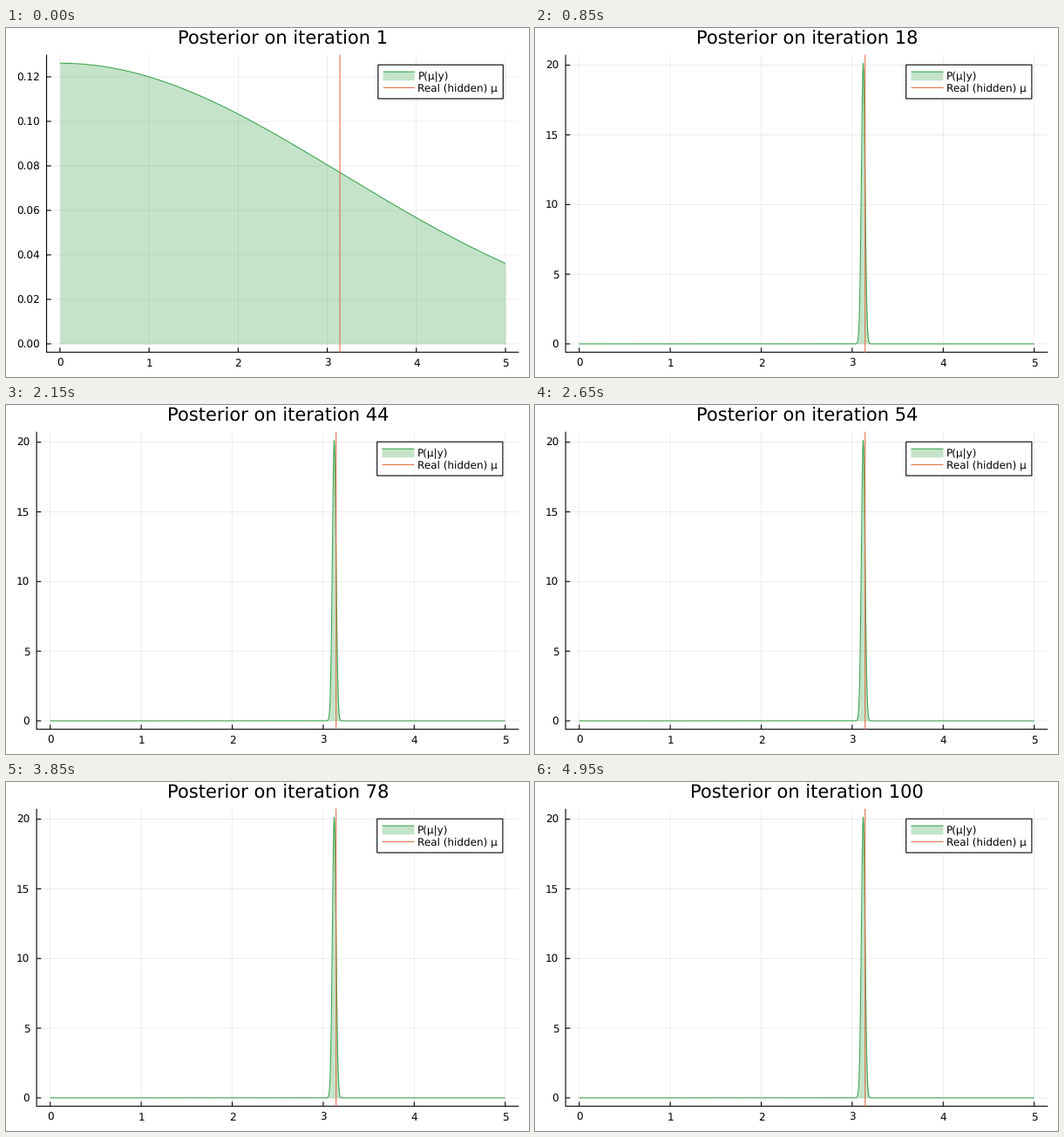
A matplotlib script for the animation above (5000 ms loop, 600 px wide and 400 px high).

```python
import numpy as np
import matplotlib.pyplot as plt
from matplotlib.animation import FuncAnimation
from matplotlib.patches import Rectangle

W, H, DPI = 600, 400, 100
FRAMES, INTERVAL = 100, 50
PX = 72 / DPI  # points per pixel

GREEN, RED = "#3da44e", "#e36f47"
TOP, BOTTOM, RIGHT = 30.65, 371.65, 588.35
SMALL, LARGE = 12, 21
HIDDEN_MU = 3.1415

# Variational estimate of a normal mean with unknown precision
N_OBS = 1000
PRIOR_VAR = 10.0
SAMPLE_MEAN = 3.121
SAMPLE_VAR = 0.391

plt.rcParams.update({
    "font.family": "DejaVu Sans",
    "text.hinting": "none",
    "savefig.dpi": DPI,
    "path.snap": False,
})


def posteriors(count):
    """Mean and variance of q(mu) after each iteration."""
    mean, var = 0.0, PRIOR_VAR
    steps = [(mean, var)]
    for _ in range(count - 1):
        noise = SAMPLE_VAR + var + (SAMPLE_MEAN - mean) ** 2
        var = 1 / (1 / PRIOR_VAR + N_OBS / noise)
        mean = var * N_OBS * SAMPLE_MEAN / noise
        steps.append((mean, var))
    return steps


def y_ticks(peak):
    """Tick values, label format and label width in em."""
    if peak < 1:
        return np.arange(0, peak, 0.02), "{:.2f}", 2.226
    if peak < 5:
        return np.arange(0, peak, 0.5), "{:.1f}", 1.59
    return np.arange(0, peak * 1.03, 5), "{:.0f}", 1.272


STEPS = posteriors(FRAMES)
MU = np.linspace(0, 5, 1001)

fig = plt.figure(figsize=(W / DPI, H / DPI), dpi=DPI, facecolor="white")
ax = fig.add_axes([0, 0, 1, 1])


def line(xs, ys, color="black", width=1.1, **kw):
    ax.plot(xs, ys, color=color, lw=width * PX, solid_capstyle="butt", **kw)


def label(x, y, text, size=SMALL, ha="left"):
    ax.text(x, y, text, fontsize=size * PX, ha=ha, va="baseline", color="black")


def draw_axes(left, to_x, to_y, ticks, fmt):
    for v in range(6):
        x = to_x(v)
        line([x, x], [TOP, BOTTOM], width=0.7, alpha=0.1)
        line([x, x], [BOTTOM, BOTTOM - 5.2])
        label(x, 387.6, str(v), ha="center")
    for v in ticks:
        y = to_y(v)
        line([left, RIGHT], [y, y], width=0.7, alpha=0.1)
        line([left, left + 5.2], [y, y])
        label(left - 7.8, y + 4.4, fmt.format(v), ha="right")
    line([left, left], [TOP, BOTTOM + 0.5])
    line([left, RIGHT], [BOTTOM, BOTTOM])


def draw_legend(left):
    span = RIGHT - left
    right = RIGHT - span / 30
    text_x = right - 97.8
    x1 = text_x - 3.7
    x0 = x1 - span / 15
    box_x = x0 - 5.8
    ax.add_patch(Rectangle((box_x, 42.2), right - box_x, 38.8, fc="white",
                           ec="black", lw=1.1 * PX, zorder=4))
    ax.add_patch(Rectangle((x0, 50.2), x1 - x0, 10, fc=GREEN, alpha=0.3,
                           lw=0, zorder=5))
    line([x0, x1], [50.2, 50.2], GREEN, zorder=6)
    line([x0, x1], [68.4, 68.4], RED, zorder=6)
    label(text_x, 59.6, "P(μ|y)")
    label(text_x, 72.7, "Real (hidden) μ")


def draw(i):
    ax.clear()
    ax.set(xlim=(0, W), ylim=(H, 0))
    ax.axis("off")

    mean, var = STEPS[i]
    density = np.exp(-(MU - mean) ** 2 / (2 * var)) / np.sqrt(2 * np.pi * var)
    peak = density.max()
    ticks, fmt, em = y_ticks(peak)

    left = 35.1 + (em - 1.272) * SMALL
    scale_x = (RIGHT - left) / 5.3
    scale_y = (BOTTOM - TOP) / (1.06 * peak)

    def to_x(v):
        return left + (v + 0.15) * scale_x

    def to_y(v):
        return BOTTOM - (v + 0.03 * peak) * scale_y

    draw_axes(left, to_x, to_y, ticks, fmt)
    xs, ys = to_x(MU), to_y(density)
    ax.fill_between(xs, ys, to_y(0), color=GREEN, alpha=0.3, lw=0, zorder=2.5)
    line(xs, ys, GREEN, zorder=3)
    x = to_x(HIDDEN_MU)
    line([x, x], [TOP, BOTTOM], RED, zorder=3)
    draw_legend(left)
    label((left + RIGHT) / 2, 18.3, f"Posterior on iteration {i + 1}", LARGE, "center")
    for t in ax.texts:
        t.set_zorder(7)
    return []


anim = FuncAnimation(fig, draw, frames=FRAMES, interval=INTERVAL,
                     init_func=lambda: draw(0), repeat=True, repeat_delay=0)
plt.show()
```
